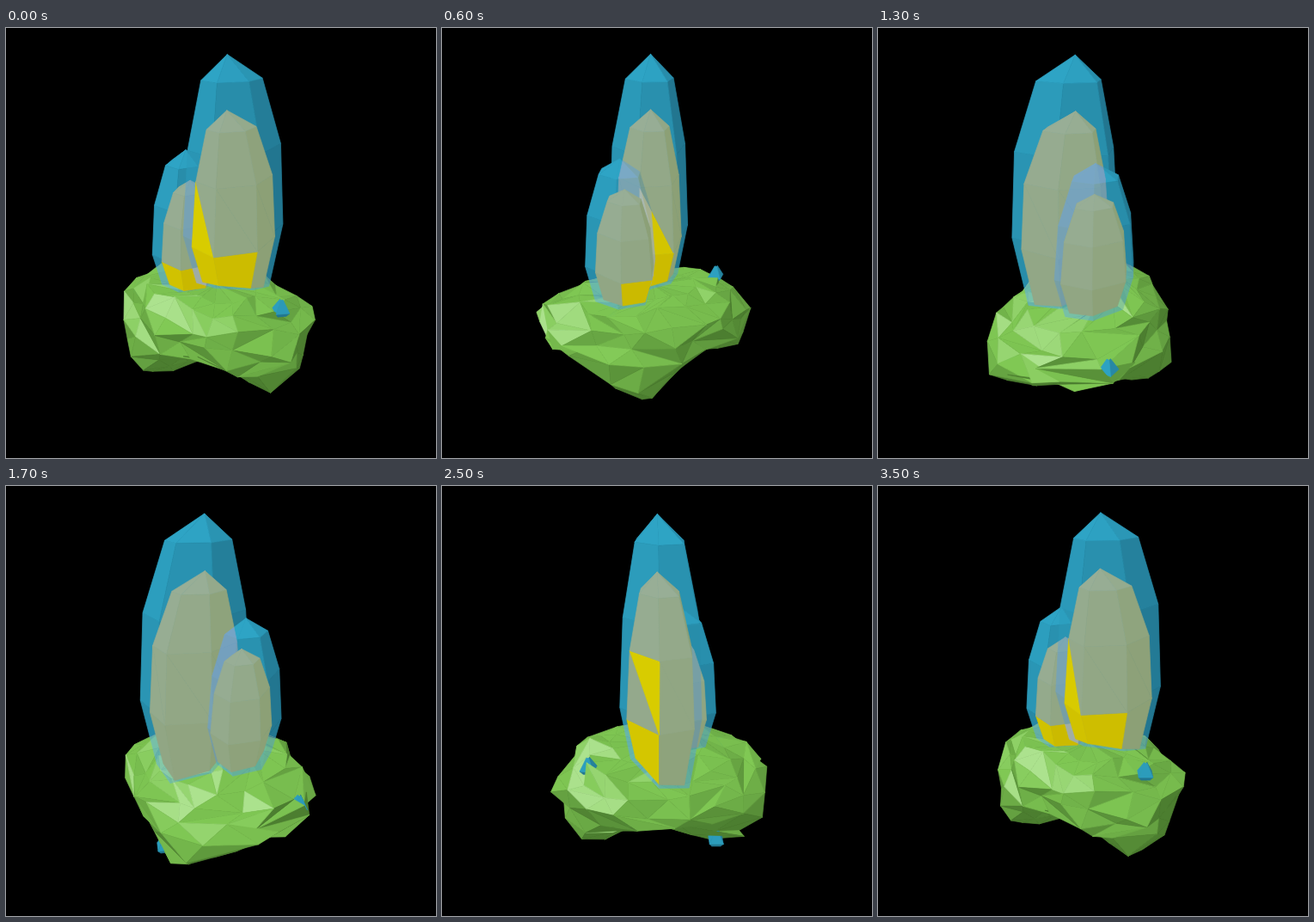
An HTML page with a canvas for the animation above (3.6 s loop, 500 px wide and 500 px high).

```html
<!DOCTYPE html>
<html lang="en">
<head>
<meta charset="utf-8">
<title>Crystal</title>
<style>
html, body { margin: 0; width: 100%; height: 100%; overflow: hidden; background: #000; }
canvas { display: block; width: 500px; height: 500px; }
</style>
</head>
<body>
<canvas id="stage" width="500" height="500"></canvas>
<script>
const ctx = document.getElementById('stage').getContext('2d');
const layer = Object.assign(document.createElement('canvas'), { width: 500, height: 500 });
const layerCtx = layer.getContext('2d');

const FOCAL = 640, PITCH_SIN = 0.39, PITCH_COS = 0.92;
const LIGHT = [-0.35, 0.66, -0.66];
const BLUE = [[34, 118, 144], [46, 164, 197]];
const BEIGE = [[140, 160, 118], [152, 174, 150]];
const YELLOW = [[200, 182, 0], [224, 214, 0]];
const GREEN = [[76, 126, 48], [128, 200, 84]];
const GLINT = [[128, 200, 84], [172, 226, 142]];

const rad = deg => deg * Math.PI / 180;
const cosd = deg => Math.cos(rad(deg));
const sind = deg => Math.sin(rad(deg));
const noise = n => { const v = Math.sin(n * 127.1 + 11.7) * 43758.5453; return (v - Math.floor(v)) * 2 - 1; };
const polar = (dist, dir, h) => [dist * cosd(dir), h, dist * sind(dir)];
const range = (n, make) => Array.from({ length: n }, (_, i) => make(i));

// Joins stacked rings of points (top to bottom) with quads.
function skin(rings) {
  return rings.slice(1).flatMap((down, band) => {
    const up = rings[band], n = up.length;
    return range(n, j => {
      const k = (j + 1) % n;
      return { band, side: j, points: [up[j], up[k], down[k], down[j]] };
    });
  });
}

// Height and width of the rings of a crystal, from tip to foot, as shares of the whole.
const PROFILE = [[1, 0], [0.907, 0.55], [0.637, 0.88], [0.27, 1], [0, 0.76]];

function crystal(form, dist, tall, wide) {
  const { foot, height, width, lean, dir, axis, stretch, turn, tilt } = form;
  return skin(PROFILE.map(([t, w]) => range(6, j => {
    const a = turn + 60 * j;
    const size = width * wide * w;
    const u = size * (1 + stretch) * cosd(a - axis), v = size * (1 - stretch) * sind(a - axis);
    const h = foot + height * tall * t - (t ? 0 : tilt * cosd(a - 65));
    const [x, y, z] = polar(dist - lean * t ** 8, dir, h);
    return [x + u * cosd(axis) - v * sind(axis), y, z + u * sind(axis) + v * cosd(axis)];
  })));
}

// Part of the core lies bare: its lowest band on one side, and half quads above that.
function coreFaces({ turn, wedges }, faces) {
  return faces.flatMap(({ band, side, points: [a, b, c, d] }) => {
    const mid = turn + 60 * side + 30;
    const open = sind(mid) < -0.3;
    const face = (points, bare) => ({ points, mid, tones: BEIGE, bare: open && bare });
    if (!wedges || band !== 2) return [face([a, b, c, d], band === 3)];
    return [face([a, b, c], cosd(mid) > 0.5), face([a, c, d], cosd(mid) < -0.5)];
  });
}

const paint = (faces, tones) => faces.map(({ points }) => ({ points, tones }));

function makeCrystal(form) {
  return {
    form,
    shell: paint(crystal(form, form.dist, 1, 1), BLUE),
    core: coreFaces(form, crystal(form, form.coreDist, 0.79, 0.84))
  };
}

const crystals = [
  { dist: 27, coreDist: 27, dir: 39, lean: 13, foot: -63, height: 270.5, width: 57, axis: 40, stretch: 0.17, turn: 10, tilt: 17, wedges: true },
  { dist: 42, coreDist: 37, dir: 150, lean: 2, foot: -60, height: 165, width: 44.5, axis: 70, stretch: 0.12, turn: 20, tilt: 4 }
].map(makeCrystal);

function makeRock() {
  const sides = 18, bands = 10;
  const rings = range(bands + 1, i => range(sides, j => {
    const seed = i * sides + j;
    const swing = 180 * i / bands;
    const k = Math.max(0, sind(swing)) ** 0.7;
    const low = Math.max(0, -cosd(swing)), high = Math.max(0, cosd(swing));
    const a = (j + (i % 2) / 2 + 0.35 * noise(seed)) * 360 / sides;
    const lobe = cosd(3 * (a - 80));
    const r = k * (114 + 14 * cosd(2 * (a - 130)) + 12 * cosd(a - 90) + 25 * low * lobe + 9 * noise(seed + 300));
    const h = -100 + 46 * cosd(swing) - k * (12 * high * cosd(a - 65) + 34 * low * lobe - 6 * noise(seed + 700));
    return polar(r, a, h);
  }));
  return skin(rings).flatMap(({ points: [a, b, c, d] }, i) =>
    (noise(i + 40) > 0 ? [[a, b, c], [a, c, d]] : [[a, b, d], [b, c, d]]).map(points => ({ points })));
}

// A small crystal that pokes out of the rock.
function shard(dist, dir, h) {
  const ring = (y, size) => range(4, i => {
    const [x, , z] = polar(size, dir + 90 * i, 0);
    const [cx, cy, cz] = polar(dist, dir, h + y);
    return [x + cx, cy, z + cz];
  });
  return skin([ring(10, 2), ring(-4, 11), ring(-9, 7)]);
}

const ground = [
  ...paint(makeRock(), GREEN),
  ...paint([...shard(88, 325, -57), ...shard(102, 65, -138), ...shard(118, 150, -90)], BLUE)
];

function project([x, h, z], c, s) {
  const vx = x * c - z * s, depth = x * s + z * c;
  const vy = PITCH_COS * h + PITCH_SIN * depth;
  const vz = PITCH_COS * depth - PITCH_SIN * h;
  const scale = FOCAL / (FOCAL + vz);
  return { v: [vx, vy, vz], x: 245 + vx * scale, y: 250 - vy * scale };
}

function brightness(pts) {
  const diff = (a, b) => a.v.map((n, i) => n - b.v[i]);
  const a = diff(pts[2], pts[0]), b = diff(pts[pts.length - 1], pts[1]);
  const n = [a[1] * b[2] - a[2] * b[1], a[2] * b[0] - a[0] * b[2], a[0] * b[1] - a[1] * b[0]];
  const sign = n[2] > 0 ? -1 : 1;
  return sign * n.reduce((sum, q, i) => sum + q * LIGHT[i], 0) / (Math.hypot(...n) || 1);
}

const clamp = t => Math.max(0, Math.min(1, t));
const mix = ([from, to], t) => `rgb(${from.map((n, i) => Math.round(n + (to[i] - n) * clamp(t)))})`;

function colour({ tones, bare, mid }, lit, angle) {
  if (tones === GREEN) return lit > 0.94 ? mix(GLINT, (lit - 0.94) / 0.05) : mix(GREEN, lit * 1.06);
  const facing = bare && (mid + angle) % 360 < 325;
  return mix(facing ? YELLOW : tones, (lit + 0.1) / 0.95);
}

function drawFaces(g, faces, angle) {
  const c = cosd(angle), s = sind(angle);
  const visible = [];
  for (const face of faces) {
    const pts = face.points.map(p => project(p, c, s));
    const area = pts.reduce((sum, p, i) => {
      const q = pts[(i + 1) % pts.length];
      return sum + p.x * q.y - q.x * p.y;
    }, 0);
    if (area <= 0.01) continue;
    visible.push({ face, pts, far: pts.reduce((sum, p) => sum + p.v[2], 0) / pts.length });
  }
  visible.sort((a, b) => b.far - a.far);
  g.lineWidth = 0.7;
  g.lineJoin = 'round';
  for (const { face, pts } of visible) {
    g.fillStyle = g.strokeStyle = colour(face, brightness(pts), angle);
    g.beginPath();
    pts.forEach(p => g.lineTo(p.x, p.y));
    g.closePath();
    g.fill();
    g.stroke();
  }
}

function drawCrystal({ shell, core }, angle) {
  layerCtx.clearRect(0, 0, 500, 500);
  drawFaces(layerCtx, shell, angle);
  ctx.globalCompositeOperation = 'lighten';
  ctx.drawImage(layer, 0, 0);
  ctx.globalCompositeOperation = 'source-over';
  ctx.globalAlpha = 0.25;
  ctx.drawImage(layer, 0, 0);
  ctx.globalAlpha = 1;
  drawFaces(ctx, core, angle);
}

function draw(angle) {
  const depth = ({ form }) => form.dist * sind(form.dir + angle);
  ctx.fillStyle = '#000';
  ctx.fillRect(0, 0, 500, 500);
  drawFaces(ctx, ground, angle);
  [...crystals].sort((a, b) => depth(b) - depth(a)).forEach(c => drawCrystal(c, angle));
}

const start = performance.now();
let shown = -1;
function tick() {
  const step = Math.floor((performance.now() - start) / 100) % 36;
  if (step !== shown) draw(10 * (shown = step));
  requestAnimationFrame(tick);
}
tick();
</script>
</body>
</html>
```
